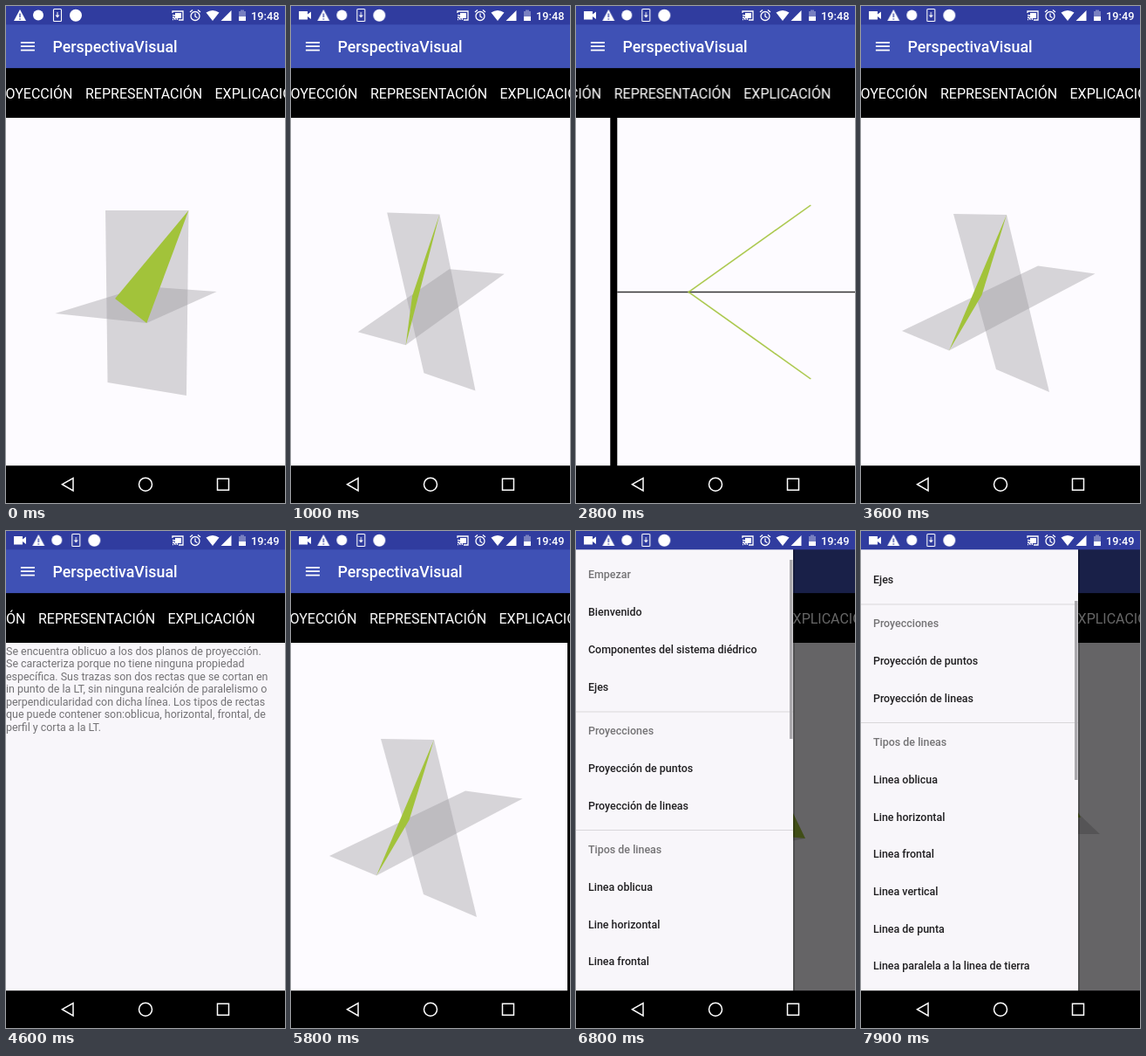
An HTML page without scripts that plays this animation: 320x569 px, repeating every 8 s.

```html
<!DOCTYPE html>
<html lang="es">
<head>
<meta charset="utf-8">
<title>Planos</title>
<style>
html, body { margin: 0; width: 100%; height: 100%; overflow: hidden; background: #000; }
svg { display: block; width: 320px; height: 569px; font-family: Roboto, sans-serif; }
svg * { animation-duration: 8s; animation-iteration-count: infinite; animation-timing-function: linear; }

.body { font-size: 12.44px; fill: #737275; }
.tabs { font-size: 16px; fill: #fff; }
.menu { font-size: 12.44px; font-weight: 500; fill: #201f21; }
.menu .head { fill: #747375; }
.plane { fill: #98959a; fill-opacity: .385; }
.line { fill: none; stroke: #fff; stroke-width: 1.3; }

/* Page slides */
.pages { animation-name: pages; }
.tabs { animation-name: tabs; }
@keyframes pages {
  0%, 13.75% { transform: translateX(0); animation-timing-function: ease-out; }
  17.5%, 21.25% { transform: translateX(-320px); animation-timing-function: ease-out; }
  24.4% { transform: translateX(-636px); }
  25% { transform: translateX(-638.5px); }
  26.25%, 30% { transform: translateX(-640px); animation-timing-function: ease-out; }
  33.75%, 34.4% { transform: translateX(-320px); animation-timing-function: ease-out; }
  42.5%, 46.25% { transform: translateX(0); animation-timing-function: ease-out; }
  50%, 53.75% { transform: translateX(-320px); animation-timing-function: ease-out; }
  57.5%, 63.75% { transform: translateX(-640px); animation-timing-function: ease-out; }
  68.1% { transform: translateX(-320px); animation-timing-function: ease-out; }
  72.5% { transform: translateX(-3px); }
  73.75%, 100% { transform: translateX(0); }
}
@keyframes tabs {
  0%, 13.75% { transform: translateX(0); animation-timing-function: ease-out; }
  17.5%, 34.4% { transform: translateX(-54px); animation-timing-function: ease-out; }
  42.5%, 46.25% { transform: translateX(0); animation-timing-function: ease-out; }
  50%, 68.1% { transform: translateX(-54px); animation-timing-function: ease-out; }
  72.5% { transform: translateX(-1px); }
  73.75%, 100% { transform: translateX(0); }
}
.seam { animation-name: seam; animation-timing-function: step-end; }
@keyframes seam {
  0%, 43%, 74% { opacity: 0; }
  34.5%, 68.2% { opacity: 1; }
}

/* Turning model */
.upright { animation-name: upright; }
.ground { animation-name: ground; }
.oblique { fill: #a2c33a; animation-name: oblique; }
@keyframes upright {
  0% { d: path("M114 234L209.5 234L207 446L116.5 431Z"); }
  5.5% { d: path("M134 228L190 236L186 432L138 444Z"); }
  13.75%, 80.5% { d: path("M106 238L167 239L216 442L155 416Z"); }
  84%, 100% { d: path("M118 235L207 236L205 440L119 445Z"); }
}
@keyframes ground {
  0% { d: path("M56 352L161 363L242 327L158 321Z"); }
  5.5% { d: path("M245 380L305 352L110 308L60 322Z"); }
  13.75%, 80.5% { d: path("M47 372L101 394.5L268.5 306.5L203 297.5Z"); }
  84%, 86% { d: path("M170 368L263 352L165 320L80 328Z"); }
  98%, 100% { d: path("M190 347L274 347L230 305L90 318Z"); }
}
@keyframes oblique {
  0% { d: path("M209.5 234L161 363L125 335Z"); }
  5.5% { d: path("M190 236L305 352L142 340Z"); }
  13.75%, 80.5% { d: path("M167 239L101 394.5L138.5 331Z"); }
  84%, 86% { d: path("M207 236L263 352L120 338Z"); }
  98%, 100% { d: path("M205 238L252 328L150 330Z"); }
}

/* Drawer */
.dim { animation-name: dim; }
.drawer { animation-name: drawer; }
.list { animation-name: list; }
.thumb { animation-name: thumb; }
@keyframes dim { 0%, 80.3% { opacity: 0; } 84%, 100% { opacity: .6; } }
@keyframes drawer {
  0%, 80.3% { transform: translateX(-260px); animation-timing-function: ease-out; }
  84.4%, 100% { transform: translateX(0); }
}
@keyframes list {
  0%, 85.5% { transform: translateY(0); animation-timing-function: ease-in-out; }
  98.5%, 100% { transform: translateY(-123px); }
}
@keyframes thumb {
  0%, 85.5% { transform: translateY(0); animation-timing-function: ease-in-out; }
  98.5%, 100% { transform: translateY(47px); }
}

/* Status bar */
.notes, .camera, .before, .after { animation-timing-function: step-end; }
.notes { animation-name: notes; }
.camera { animation-name: camera; }
.before { animation-name: before; }
.after { animation-name: after; }
@keyframes notes { 0% { transform: none; } 6.25%, 100% { transform: translateX(21.3px); } }
@keyframes camera { 0% { opacity: 0; } 6.25%, 100% { opacity: 1; } }
@keyframes before { 0% { opacity: 1; } 45%, 100% { opacity: 0; } }
@keyframes after { 0% { opacity: 0; } 45%, 100% { opacity: 1; } }
</style>
</head>
<body>
<svg viewBox="0 0 320 569">
  <g class="pages">
    <rect y="128" width="641" height="399" fill="#fdfbff"/>
    <rect x="640" y="128" width="320" height="399" fill="#f8f6fa"/>
    <path class="plane upright" d="M114 234L209.5 234L207 446L116.5 431Z"/>
    <path class="plane ground" d="M56 352L161 363L242 327L158 321Z"/>
    <path class="oblique" d="M209.5 234L161 363L125 335Z"/>
    <g fill="none" stroke-width="1.5">
      <path d="M328 327.5H632" stroke="#333"/>
      <path d="M550 228L410 327.5L550 427" stroke="#a2c33a"/>
    </g>
    <rect class="seam" x="320" y="128" width="8" height="399"/>
    <g class="body">
      <text x="640" y="141.5">Se encuentra oblicuo a los dos planos de proyección.</text>
      <text x="640" y="156.1">Se caracteriza porque no tiene ninguna propiedad</text>
      <text x="640" y="170.7">específica. Sus trazas son dos rectas que se cortan en</text>
      <text x="640" y="185.3">in punto de la LT, sin ninguna realción de paralelismo o</text>
      <text x="640" y="199.8">perpendicularidad con dicha línea. Los tipos de rectas</text>
      <text x="640" y="214.4">que puede contener son:oblicua, horizontal, frontal, de</text>
      <text x="640" y="229">perfil y corta a la LT.</text>
    </g>
  </g>

  <rect y="71" width="320" height="57"/>
  <g class="tabs">
    <text x="76.5" y="106" text-anchor="end">PROYECCIÓN</text>
    <text x="91" y="106">REPRESENTACIÓN</text>
    <text x="239.5" y="106">EXPLICACIÓN</text>
  </g>

  <rect y="21" width="320" height="50.1" fill="#3f51b5"/>
  <path d="M16.9 41.8H32.9M16.9 46.2H32.9M16.9 50.7H32.9" class="line" style="stroke-width:1.8"/>
  <text x="53.5" y="53" font-size="17.78" font-weight="500" fill="#fff">PerspectivaVisual</text>

  <rect class="dim" y="21" width="320" height="506"/>
  <g class="drawer">
    <rect x="249" y="21" width="2" height="506" opacity=".2"/>
    <rect y="21" width="249" height="506" fill="#f8f6fa"/>
    <g class="list menu">
      <path d="M0 207H249M0 342.5H249" stroke="#d9d7da"/>
      <g class="head">
        <text x="14" y="54.4">Empezar</text>
        <text x="14" y="233.4">Proyecciones</text>
        <text x="14" y="369.4">Tipos de lineas</text>
      </g>
      <text x="14" y="97.3">Bienvenido</text>
      <text x="14" y="140">Componentes del sistema diédrico</text>
      <text x="14" y="182.6">Ejes</text>
      <text x="14" y="276">Proyección de puntos</text>
      <text x="14" y="318.6">Proyección de lineas</text>
      <text x="14" y="412">Linea oblicua</text>
      <text x="14" y="454.7">Line horizontal</text>
      <text x="14" y="497.4">Linea frontal</text>
      <text x="14" y="540">Linea vertical</text>
      <text x="14" y="582.7">Linea de punta</text>
      <text x="14" y="625.4">Linea paralela a la linea de tierra</text>
    </g>
    <rect class="thumb" x="245" y="33" width="3.5" height="205" fill="#aaa8ac"/>
  </g>

  <rect width="320" height="21.3" fill="#303c9f"/>
  <path class="camera" d="M9 6H19V9.500L23 6.500V15L19 12V15.500H9Z" fill="#fff"/>
  <g class="notes" fill="#fff">
    <path d="M16 4L23 17H9Z"/>
    <path d="M16 8.500V13M16 14.300V15.700" stroke="#303c9f" stroke-width="1.3"/>
    <circle cx="37" cy="10.5" r="6"/>
    <rect x="54.5" y="3.5" width="9" height="14" rx="1" class="line" style="stroke-width:1.1"/>
    <path d="M58.500 7H59.500V10.500H61.500L59 13.500L56.500 10.500H58.500Z"/>
    <circle cx="80" cy="10.7" r="7"/>
  </g>
  <g class="line">
    <path d="M191 8V6H203V16H198M191 15.500H192M191 13Q194 13 194 16M191 10.500Q196.500 10.500 196.500 16"/>
    <circle cx="217" cy="11.5" r="5"/>
    <path d="M217 8.500V12L219.500 13.500M211 7L214 4.500M223 7L220 4.500"/>
  </g>
  <g fill="#fff">
    <rect x="194" y="8" width="7" height="6"/>
    <path d="M229.500 7.500Q237 2.500 244.500 7.500L237 17Z"/>
    <path d="M258.500 5V17H246.500Z"/>
    <path d="M267 6H269V4.500H273V6H275V12H267Z" opacity=".35"/>
    <path d="M267 12H275V17H267Z"/>
    <g font-size="12.8" font-weight="500">
      <text class="before" x="281" y="15.5">19:48</text>
      <text class="after" x="281" y="15.5">19:49</text>
    </g>
  </g>

  <rect y="526.2" width="320" height="43"/>
  <g class="line" style="stroke-width:1.5">
    <path d="M64.500 547.700L77 540.500V555Z"/>
    <circle cx="160" cy="547.7" r="7.5"/>
    <rect x="242.5" y="541.2" width="13" height="13"/>
  </g>
</svg>
</body>
</html>
```
